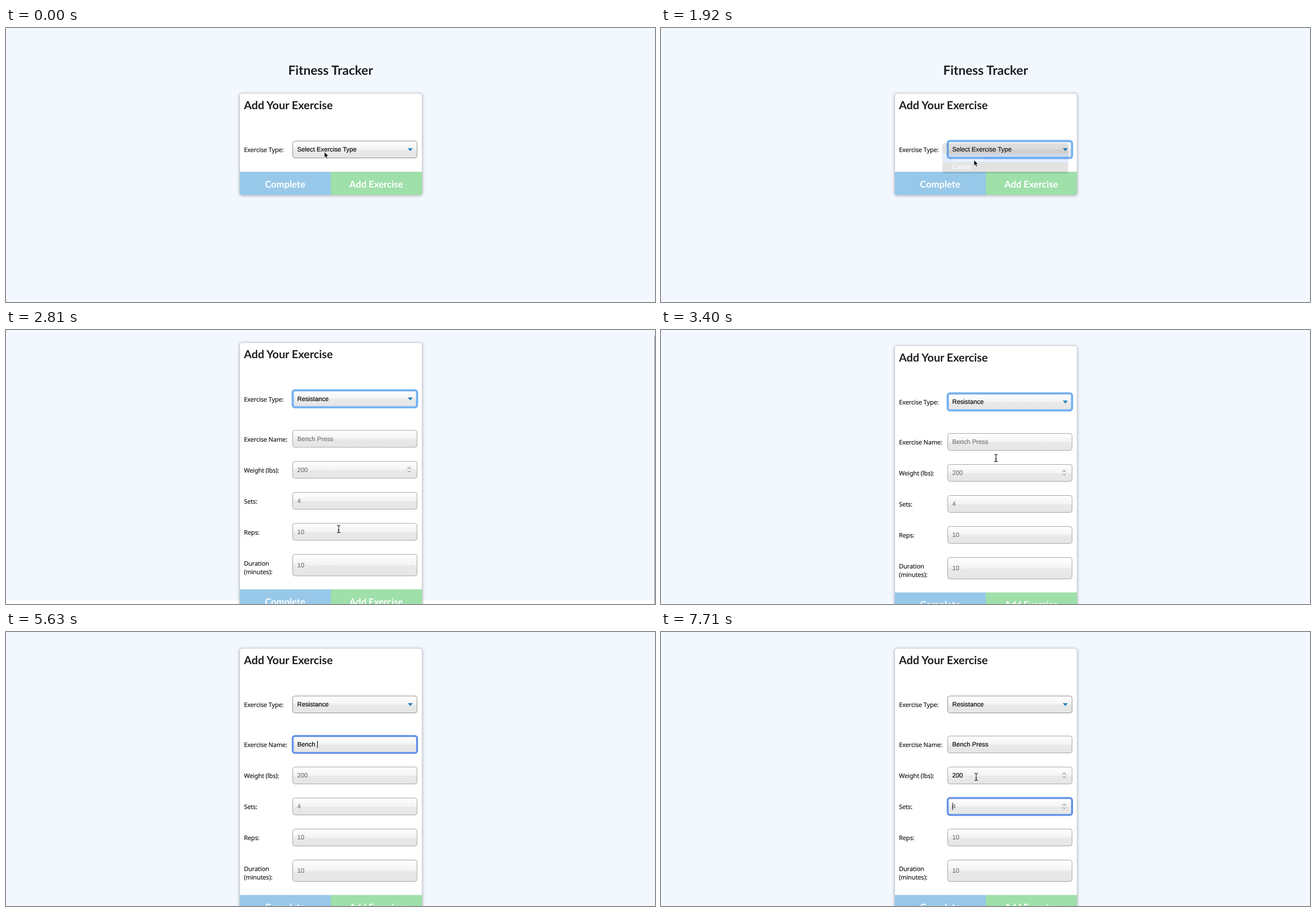
An HTML page for the animation above (8 s loop, 1151 px wide and 486 px high).

```html
<!DOCTYPE html>
<html lang="en">
<head>
<meta charset="utf-8">
<title>Fitness Tracker</title>
<style>
  html, body { margin: 0; width: 100%; height: 100%; overflow: hidden; background: #f3f8ff; }
  svg { display: block; }
  text { text-rendering: geometricPrecision; white-space: pre; }
  .head { font-family: Lato, sans-serif; font-weight: 700; fill: #1c1d1f; }
  .button { font: 700 16.6px Lato, sans-serif; fill: #fff; text-anchor: middle; }
  .label { font: 11px "Noto Sans", sans-serif; letter-spacing: -.12px; fill: #161616; stroke: #161616; stroke-width: .15px; }
  .value { font: 11.3px "Liberation Sans", sans-serif; fill: #000; stroke: #000; stroke-width: .15px; }
  .hint { fill: #737373; stroke: #737373; }
  .menu { fill: #fff; stroke: #fff; }
  .off { fill: #7d7d7d; stroke: none; }
  .card { filter: drop-shadow(0 1px 2.5px rgba(0, 0, 0, .3)); }
</style>
</head>
<body>
<svg width="1151" height="486" viewBox="0 0 1151 486">
  <defs>
    <linearGradient id="gloss" x2="0" y2="1">
      <stop offset="0" stop-color="#fff"/>
      <stop offset=".5" stop-color="#f3f3f3"/>
      <stop offset=".52" stop-color="#e9e9e9"/>
      <stop offset="1" stop-color="#e6e6e6"/>
    </linearGradient>
  </defs>
  <g id="scene"></g>
</svg>
<script>
const LOOP = 8000;
const STEP = 148;
const ROW = 15.2;
const scene = document.getElementById('scene');
const pen = document.createElement('canvas').getContext('2d');
pen.font = '11.3px "Liberation Sans", sans-serif';

const clicks = { type: 140, pick: 1770, name: 3840, weight: 6800, sets: 7690 };
const formOpens = 2060;
const typing = [
  { id: 'name', str: 'Ben', start: 4440, pace: STEP },
  { id: 'name', str: 'ch Press', start: 5328, pace: 105 },
  { id: 'weight', str: '200', start: 7104, pace: 222 },
];
// Pointer stops: time, x, y.
const stops = [
  [450, 564.5, 219.5], [1000, 556, 242], [1480, 555, 234], [1950, 555, 234], [2370, 590, 345],
  [2810, 590, 353], [3400, 594, 227], [3700, 582, 198], [6220, 582, 198], [6660, 559, 257],
];

const clamp = v => Math.min(1, Math.max(0, v));
const ramp = (t, from, to) => clamp((t - from) / (to - from));
const smooth = p => p * p * (3 - 2 * p);
const within = (t, from, to) => t >= from && t < to;

function pointerAt(t) {
  let [, x, y] = stops[0];
  for (let i = 1; i < stops.length; i++) {
    const p = smooth(ramp(t, stops[i - 1][0], stops[i][0]));
    x += (stops[i][1] - stops[i - 1][1]) * p;
    y += (stops[i][2] - stops[i - 1][2]) * p;
  }
  return { x, y };
}

// The page scrolls past its end, then springs back.
function scrollAt(t) {
  const bounce = t < 2800 ? 0 : 6.5 * Math.exp((2810 - t) / 315);
  return 87 * smooth(ramp(t, 2520, 2810)) + Math.round(bounce * 2) / 2;
}

function focusAt(t) {
  const id = Object.keys(clicks).filter(k => clicks[k] <= t).pop();
  return id === 'pick' ? 'type' : id;
}

const typed = (id, t) => typing.filter(b => b.id === id)
  .map(b => b.str.slice(0, Math.max(0, Math.floor((t - b.start) / b.pace) + 1))).join('');

// The caret stays lit during input and blinks afterwards.
function caretOn(t) {
  const ends = typing.filter(b => b.start <= t)
    .map(b => Math.min(t, b.start + b.pace * (b.str.length - 1)));
  const last = Math.max(...ends, ...Object.values(clicks).filter(c => c <= t));
  return (t - last) % 880 < 440;
}

const text = (x, y, cls, str, extra = '') => `<text x="${x}" y="${y}" class="${cls}" ${extra}>${str}</text>`;
const rect = (x, y, w, h, attrs) => `<rect x="${x}" y="${y}" width="${w}" height="${h}" ${attrs}/>`;

function box(y, h, stroke, rings = []) {
  const frame = attrs => rect(508.5, y, 220.5, h, `rx="4" ${attrs}`);
  return frame(`fill="url(#gloss)" stroke="${stroke}"`)
    + rings.map(([color, width]) => frame(`fill="none" stroke="${color}" stroke-width="${width}"`)).join('');
}
const selectRing = [['#a9cff8', 4.4], ['#6cabf0', 2.6]];
const inputRing = [['#a3c0f3', 4], ['#4f82e2', 2]];

const spinner = y => rect(711.5, y - 6, 7, 12, 'rx="3" fill="#f7f7f7" stroke="#c9c9c9" stroke-width=".8"')
  + `<path d="M713.2 ${y - 1.8}l1.8-2 1.8 2M713.2 ${y + 1.8}l1.8 2 1.8-2" fill="none" stroke="#444"/>`;

function field({ id, label, hint, h = 30, spin }, y, t) {
  const base = y + h / 2 + 3.7;
  const value = typed(id, t);
  const focused = focusAt(t) === id;
  let out = label.map((s, i) => text(422, y + 19.6 + i * ROW, 'label', s)).join('')
    + box(y, h, '#a6a6a6', focused ? inputRing : [])
    + text(516.5, base, value ? 'value' : 'value hint', value || hint);
  if (spin) out += spinner(y + h / 2);
  if (focused && caretOn(t)) {
    out += rect(516.6 + pen.measureText(value).width, base - 10.3, 1, 13, 'fill="#000"');
  }
  return out;
}

const resistanceFields = t => [
  { id: 'name', label: ['Exercise Name:'], hint: 'Bench Press' },
  { id: 'weight', label: ['Weight (lbs):'], hint: '200', spin: within(t, 2360, clicks.name) || t > 6500 },
  { id: 'sets', label: ['Sets:'], hint: '4', spin: focusAt(t) === 'sets' },
  { id: 'reps', label: ['Reps:'], hint: '10' },
  { id: 'duration', label: ['Duration', '(minutes):'], hint: '10', h: 38 },
].map((f, i) => field(f, 271.5 + i * 55, t)).join('');

function card(t) {
  const open = t >= formOpens;
  const foot = open ? 553.6 : 255;
  const bottom = foot + 41;
  const focused = focusAt(t) === 'type';
  return rect(414.5, 116, 323.5, bottom - 116, 'rx="4" fill="#fff" stroke="#cfd2d6" class="card"')
    + text(422, 143.5, 'head', 'Add Your Exercise', 'font-size="19.8"')
    + `<path d="M414.5 ${foot}H576V${bottom}H418q-3.5 0-3.5-3.5z" fill="#98c8e9"/>`
    + `<path d="M576 ${foot}H738V${bottom - 3.5}q0 3.5-3.5 3.5H576z" fill="#9fdfa9"/>`
    + text(495, foot + 27.7, 'button', 'Complete')
    + text(656.5, foot + 27.7, 'button', 'Add Exercise')
    + text(422, 220.2, 'label', 'Exercise Type:')
    + box(200.5, 30, '#929292', focused ? selectRing : [])
    + text(516.5, 219.2, 'value', open ? 'Resistance' : 'Select Exercise Type')
    + '<path d="M712.5 213.2h9l-4.5 5z" fill="#1c7fc2"/>'
    + (open ? resistanceFields(t) : '');
}

function menu(t) {
  const opacity = t < clicks.type ? 0 : 1 - ramp(t, 1776, 1946);
  if (!opacity) return '';
  const hover = Math.floor((pointerAt(t).y - 208) / ROW);
  const blink = within(t, clicks.pick, clicks.pick + STEP);
  const rows = ['Select Exercise Type', 'Resistance', 'Cardio'];
  return `<g opacity="${opacity}">`
    + rect(499, 204.5, 223, 53.5, 'rx="4" fill="#2d2d2d" stroke="#555" stroke-width=".6"')
    + (hover > 0 && !blink ? rect(499, 208 + hover * ROW, 223, ROW, 'fill="#3b82f0"') : '')
    + '<path d="M504.5 215.5l2.2 3 4-6.5" fill="none" stroke="#7d7d7d" stroke-width="1.3"/>'
    + rows.map((s, i) => text(516.5, 219.5 + i * ROW, i ? 'value menu' : 'value off', s)).join('')
    + '</g>';
}

function pointer(t) {
  if (within(t, 4590, 6360)) return '';
  const { x, y } = pointerAt(t);
  const beam = 'M-3-6.5q3 0 3 2v9q0 2-3 2M3-6.5q-3 0-3 2v9q0 2 3 2M-1.5 1.8h3';
  const mark = t > 2200
    ? `<path d="${beam}" fill="none" stroke="#fff" stroke-width="2.4"/><path d="${beam}" fill="none" stroke="#111" stroke-width="1.1"/>`
    : '<path d="M0 0v10.6l2.4-2.2 1.7 3.9 2-.9-1.7-3.7h3.4z" fill="#000" stroke="#fff" stroke-width=".9"/>';
  return `<g transform="translate(${x} ${y})">${mark}</g>`;
}

function picture(t) {
  const scroll = scrollAt(t);
  return `<g transform="translate(0 ${-scroll})">`
    + (scroll ? rect(0, 572.5, 1151, 60, 'fill="#fff"') : '')
    + text(575.7, 83, 'head', 'Fitness Tracker', 'font-size="22.6" text-anchor="middle"')
    + card(t) + menu(t) + '</g>'
    + (within(t, 2660, 3260) ? rect(1150, 10, 1, 476, 'fill="#8b8f94"') : '')
    + pointer(t);
}

let shown = -1;
function tick() {
  const step = Math.floor((performance.now() % LOOP + 10) / STEP);
  if (step !== shown) scene.innerHTML = picture(Math.min(step, 52) * STEP);
  shown = step;
  requestAnimationFrame(tick);
}
tick();
</script>
</body>
</html>
```
